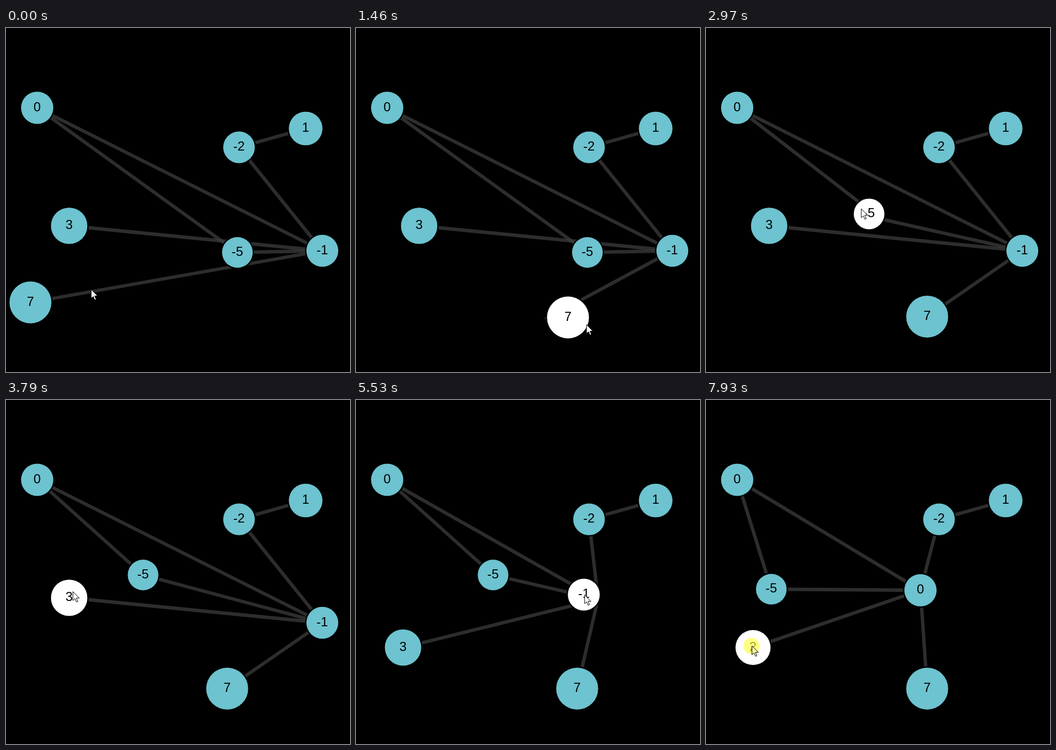
These frames come from a looping animation (640x640 px, 8000 ms). An HTML page with a canvas:

```html
<!DOCTYPE html>
<html lang="en">
<head>
<meta charset="utf-8">
<title>Dragging graph nodes</title>
<style>
  html, body { margin: 0; height: 100%; overflow: hidden; background: #000; }
  canvas { display: block; }
</style>
</head>
<body>
<canvas width="640" height="640"></canvas>
<script>
const ctx = document.querySelector('canvas').getContext('2d');
const LOOP = 8000, CLICK = 7860, UPDATE = 7895, EDGE_LAG = 70;
const TEAL = '#6dc3cf';

const nodes = {
  a: { value: 0, x: 58, y: 148.5 },
  b: { value: 1, x: 557.5, y: 187 },
  c: { value: -2, x: 433.5, y: 222 },
  d: { value: 3, x: 117.5, y: 368 },
  e: { value: -5, x: 430.5, y: 417.5 },
  f: { value: -1, x: 588.5, y: 414.5 },
  g: { value: 7, x: 45.5, y: 510.5 }
};
const edges = ['af', 'ae', 'bc', 'cf', 'df', 'ef', 'gf'];
const radius = value => 30 + value * (value > 0 ? 1.29 : 0.3);

// The pointer leaves, reaches a node, grabs it off centre by `grip`
// and pulls it along `trail` (time, node x, node y).
const gestures = [
  { id: 'g', leave: 180, reach: 480, grab: 550, grip: [34, 13],
    trail: [[970, 84, 530], [1250, 250, 547], [1530, 411.5, 537]] },
  { id: 'e', leave: 1760, reach: 2000, grab: 2180, grip: [-15, -10],
    trail: [[2420, 439, 412], [3250, 255, 325.5]] },
  { id: 'd', leave: 3460, reach: 3720, grab: 3790, grip: [6.5, -12],
    trail: [[4270, 87.5, 460.5]] },
  { id: 'f', leave: 4360, reach: 4900, grab: 4980, grip: [1, 0],
    trail: [[5050, 592.5, 417], [5670, 399, 354]] },
  { id: 'e', leave: 5890, reach: 6330, grab: 6400, grip: [-10, 7],
    trail: [[6550, 245, 341], [6690, 226, 363], [7110, 121.5, 352]] },
  { id: 'd', leave: 7340, reach: 7590, grab: LOOP, grip: [-2.5, -3.5], trail: [] }
];

// Expand the gestures into one pointer path and one path per node.
const pointerPath = [[0, 158, 486]], nodePaths = {};
for (const id in nodes) nodePaths[id] = [[0, nodes[id].x, nodes[id].y]];
for (const { id, leave, reach, grab, grip, trail } of gestures) {
  const [, px, py] = pointerPath.at(-1), [, x, y] = nodePaths[id].at(-1);
  const held = [[grab, x, y], ...trail];
  nodePaths[id].push(...held);
  pointerPath.push([leave, px, py]);
  for (const [time, nx, ny] of [[reach, x, y], ...held])
    pointerPath.push([time, nx + grip[0], ny + grip[1]]);
}

function slope(path, i, axis) {
  const p = path[i], q = path[i + 1];
  return p && q ? (q[axis] - p[axis]) / (q[0] - p[0]) : 0;
}

// Monotone tangent, so holds stay still and nothing overshoots
function tangent(path, i, axis) {
  const before = slope(path, i - 1, axis), after = slope(path, i, axis);
  return before * after > 0 ? 2 * before * after / (before + after) : 0;
}

function locate(path, t) {
  const next = path.findIndex(p => p[0] > t);
  if (next < 1) {
    const [, x, y] = next ? path.at(-1) : path[0];
    return { x, y };
  }
  const i = next - 1, p = path[i], q = path[next];
  const span = q[0] - p[0], u = (t - p[0]) / span, ease = u * u * (3 - 2 * u);
  const along = axis => p[axis] + (q[axis] - p[axis]) * ease + span * u * (1 - u) *
    ((1 - u) * tangent(path, i, axis) - u * tangent(path, next, axis));
  return { x: along(1), y: along(2) };
}

function valueAt(id, t) {
  const change = { d: -1, f: 1 }[id] || 0;
  return nodes[id].value + (t >= UPDATE ? change : 0);
}

function disc(x, y, r, color) {
  ctx.fillStyle = color;
  ctx.beginPath();
  ctx.arc(x, y, r, 0, 2 * Math.PI);
  ctx.fill();
}

function drawEdge([from, to], t) {
  const p = locate(nodePaths[from], t), q = locate(nodePaths[to], t);
  ctx.beginPath();
  ctx.moveTo(p.x, p.y);
  ctx.lineTo(q.x, q.y);
  ctx.stroke();
}

function drawNode(id, t, mouse) {
  const { x, y } = locate(nodePaths[id], t);
  const value = valueAt(id, t), r = radius(value);
  const hover = Math.hypot(mouse.x - x, mouse.y - y) < r;
  disc(x, y, r + 2.5, '#000');
  disc(x, y, r, hover ? '#fff' : TEAL);
  ctx.fillStyle = '#000';
  ctx.fillText(value, x, y + 6);
}

const arrow = new Path2D('M0 0V16.5L3.8 13 6.6 19.4 9.2 18.3 6.4 12H11.8Z');

function drawPointer({ x, y }, color) {
  ctx.save();
  ctx.translate(x + 0.5, y + 0.5);
  ctx.fillStyle = color;
  ctx.strokeStyle = '#000';
  ctx.lineWidth = 1;
  ctx.fill(arrow);
  ctx.stroke(arrow);
  ctx.restore();
}

function draw(t) {
  const mouse = locate(pointerPath, t), clicked = t >= CLICK;
  ctx.fillStyle = '#000';
  ctx.fillRect(0, 0, 640, 640);
  ctx.font = '24px "Liberation Sans", Arial, sans-serif';
  ctx.textAlign = 'center';
  ctx.strokeStyle = 'rgba(60, 60, 60, .75)';
  ctx.lineWidth = 6.3;
  for (const edge of edges) drawEdge(edge, t - EDGE_LAG);
  for (const id in nodes) drawNode(id, t, mouse);
  if (clicked) disc(mouse.x - 0.5, mouse.y + 0.5, 15, 'rgba(255, 255, 64, .65)');
  drawPointer(mouse, clicked ? '#ffffa0' : '#fff');
}

const start = performance.now();
function tick() {
  draw((performance.now() - start) % LOOP);
  requestAnimationFrame(tick);
}
tick();
</script>
</body>
</html>
```
